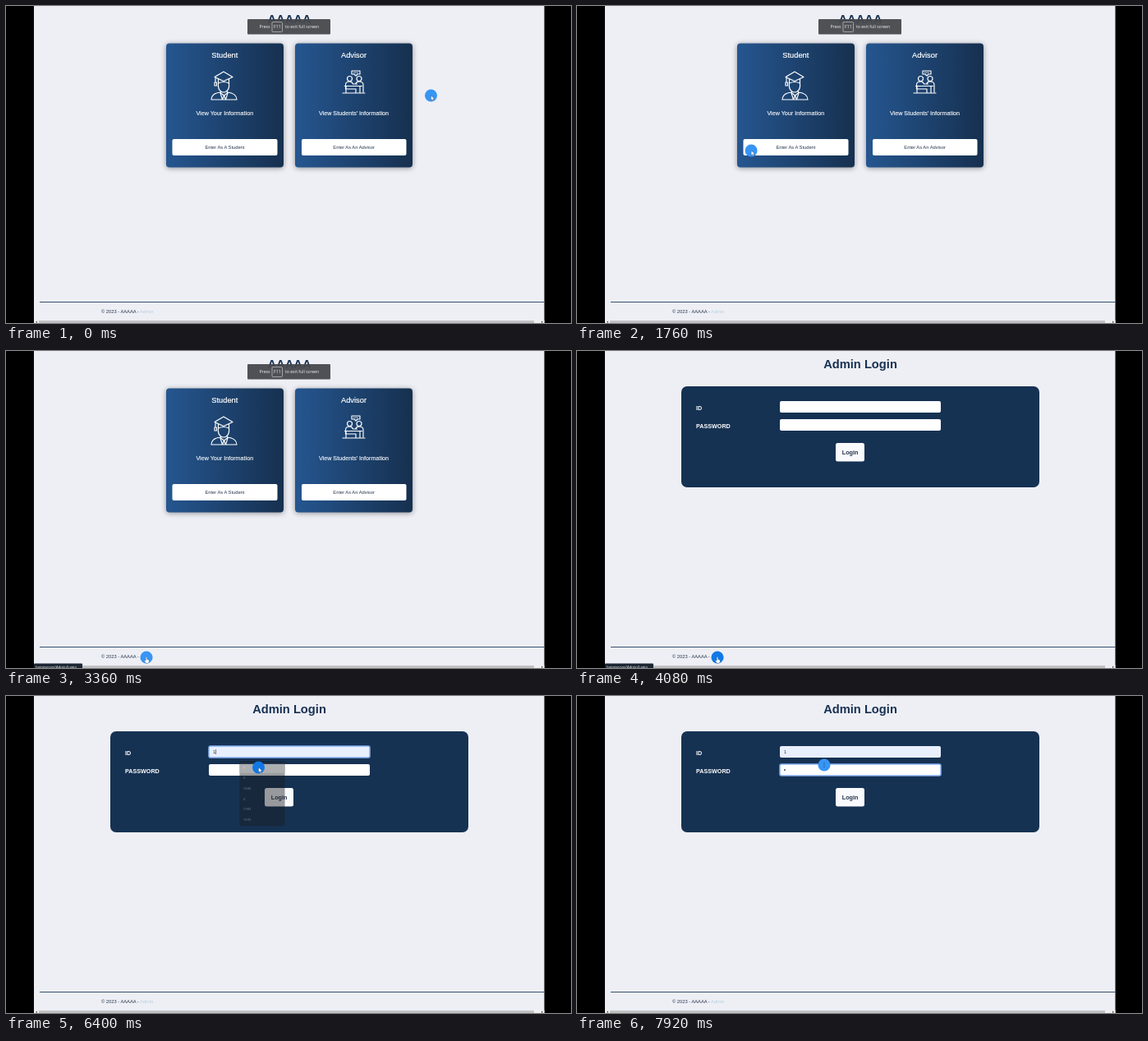
Animation, 688 px wide and 386 px high, one loop 8 s. Source, as an HTML page:

```html
<!DOCTYPE html>
<html lang="en">
<head>
<meta charset="utf-8">
<title>Admin login walkthrough</title>
<style>
  html, body { margin: 0; width: 100%; height: 100%; overflow: hidden; background: #000; }
  svg { display: block; width: 688px; height: 386px; }
  text { font-family: "Liberation Sans", Arial, sans-serif; font-size: 5.76px; fill: #26364d; }
  .mid { text-anchor: middle; }
  .title { font-size: 14.7px; font-weight: bold; fill: #183253; }
  .label { font-size: 7.2px; font-weight: bold; fill: #fff; }
  .card { filter: drop-shadow(0 1px 3px rgba(0, 0, 0, .4)); }
  .heading { font-size: 9.3px; fill: #fff; stroke: #fff; stroke-width: .2px; }
  .sub { font-size: 7.2px; fill: #fff; stroke: #fff; stroke-width: .12px; }
  .icon { fill: none; stroke: #fff; stroke-width: 1.15; stroke-linejoin: round; stroke-linecap: round; }
  .ui, .ui text { font-family: "Open Sans", "Noto Sans", sans-serif; font-size: 5.2px; fill: #f4f4f4; }
  #menu text { font-size: 4.4px; fill: #d0d2d5; }
  #menu { transform-box: fill-box; transform-origin: center; }
  .focus { stroke: #86b1f2; stroke-width: 1.5; }
</style>
</head>
<body>
<svg viewBox="0 0 688 386">
  <defs>
    <linearGradient id="blue">
      <stop offset="0" stop-color="#255690"/>
      <stop offset="1" stop-color="#16304f"/>
    </linearGradient>
  </defs>
  <rect x="34" width="621.5" height="386" fill="#eeeff5"/>

  <g id="home">
    <text class="title mid" x="345" y="21">AAAAA</text>
    <rect class="card" x="195" y="45.5" width="143" height="151" rx="4" fill="url(#blue)"/>
    <rect class="card" x="352" y="45.5" width="143" height="151" rx="4" fill="url(#blue)"/>
    <text class="heading mid" x="266.3" y="63.3">Student</text>
    <text class="heading mid" x="423.5" y="63.3">Advisor</text>
    <text class="sub mid" x="266.3" y="133.3">View Your Information</text>
    <text class="sub mid" x="423.5" y="133.3">View Students' Information</text>
    <rect x="202.5" y="162" width="128" height="20" rx="2" fill="#fff"/>
    <rect x="360" y="162" width="127.5" height="20" rx="2" fill="#fff"/>
    <text class="mid" x="266.4" y="174">Enter As A Student</text>
    <text class="mid" x="423.6" y="174">Enter As An Advisor</text>
    <g class="icon">
      <path d="M254 86.500l11-6.500 11 6.500-11 5zM255 87v6m-1 0h2.500v4h-2.500zM258.500 89v5q6.500-3 13 0v-5"/>
      <path d="M258.500 94q-1 8 4 10.500 2.500 1 5 0 5-2.500 4-10.500M261.500 104v2l4 3 4-3v-2"/>
      <path d="M261.500 105q-11 1-11.500 9h31q-.5-8-11.500-9M261 106l2.500 8 2-5 2 5 2.500-8"/>
    </g>
    <g class="icon" stroke-width="1">
      <path d="M421 79h10v4h-3l-2 2-2-2h-3zM423.500 81h.5m1.500 0h.5m1.500 0h.5"/>
      <circle cx="418.500" cy="88.500" r="3"/><circle cx="430" cy="88.500" r="3"/>
      <path d="M413.500 101v-5q0-4 5-4 3 0 4 3h5M425.500 95q1-3 4.500-3 5 0 5 4v9"/>
      <path d="M412.500 97.500h21M414 101h12v4.500M414 97.500v8M431 97.500v8M410 106h27"/>
    </g>
  </g>

  <g id="login">
    <text class="title mid" x="345" y="21">Admin Login</text>
    <rect x="127" y="43" width="436" height="123" rx="7" fill="#163253"/>
    <text class="label" x="145" y="72.100">ID</text>
    <text class="label" x="145" y="93.700">PASSWORD</text>
    <rect id="idField" x="247" y="61" width="196" height="14" rx="2" fill="#fff"/>
    <rect id="passField" x="247" y="83" width="196" height="14" rx="2" fill="#fff"/>
    <text id="idText" x="252" y="70">1</text>
    <path id="caret" d="M255.500 65v6" stroke="#222" stroke-width=".6"/>
    <circle id="passText" cx="253" cy="90" r=".9" fill="#26364d"/>
    <rect x="315" y="112" width="35" height="22.500" rx="2.500" fill="#f9fafd"/>
    <text class="label mid" x="332.600" y="126" style="fill:#22304a">Login</text>
    <g id="menu" class="ui">
      <rect x="283.500" y="77.500" width="57" height="82.500" rx="1.500" fill="#1a1c20"/>
      <rect id="hoverRow" x="283.500" y="80.500" width="57" height="12.500" fill="#45484d"/>
    </g>
  </g>

  <path d="M41 360.500H655.500" stroke="#36516f"/>
  <text x="116" y="373.800">© 2023 - AAAAA - <tspan id="link" fill="#b4cfe0">Admin</tspan></text>
  <rect x="34" y="382.500" width="621.500" height="4" fill="#f0f0f2"/>
  <rect x="40" y="383" width="603" height="3" fill="#c1c1c3"/>
  <path d="M38 383.500v2.500l-2-1.250zM652 383.500v2.500l2-1.250z" fill="#555"/>

  <g id="banner" class="ui">
    <rect x="294" y="16" width="101" height="18.500" rx="1" fill="#47494d" fill-opacity=".95"/>
    <rect x="324" y="19.500" width="12.500" height="12" rx="1" fill="none" stroke="#c8c8ca" stroke-width=".7"/>
    <text x="308.500" y="27.200">Press</text>
    <text class="mid" x="330.300" y="27.200">F11</text>
    <text x="340" y="27.200">to exit full screen</text>
  </g>
  <g id="status" class="ui">
    <rect x="34" y="380.500" width="59" height="6" rx="1" fill="#1c2733"/>
    <text x="36" y="386" style="font-size:4.200px">homeserver/Admin/Login</text>
  </g>

  <g id="cursor">
    <circle id="dot" r="7.500"/>
    <path id="arrow" d="M0 0v6l1.500-1.300 1 2.200 1-.5-1-2.100h2z" fill="#fff" stroke="#24405f" stroke-width=".4"/>
    <path id="hand" d="M-.8 0q.8-.8 1.500 0v2.500l2.500.7v2.300l-1 1.500h-3l-2-3 .8-.5 1.200 1z" fill="#fff" stroke="#24405f" stroke-width=".3"/>
    <path id="beam" d="M-1-2.500h2M0-2.500v5M-1 2.500h2" stroke="#235a9c" stroke-width=".5"/>
  </g>
</svg>
<script>
const LOOP = 8000;
const $ = id => document.getElementById(id);
const show = (id, on) => { $(id).style.display = on ? "" : "none"; };
const clamp = v => Math.min(1, Math.max(0, v));
const within = (t, from, to) => t >= from && t < to;

// time, x, y
const path = [
  [0, 517.5, 109], [80, 490, 98], [240, 284, 70], [400, 284, 70],
  [880, 210, 80], [1280, 210, 80], [2480, 216, 352], [2640, 215, 354],
  [3040, 171, 373], [4640, 171, 373], [5200, 303, 71], [5680, 303, 71],
  [6080, 307.5, 87], [6560, 307.5, 87], [6880, 302, 89], [7200, 302, 89],
  [7680, 301, 84], [8000, 301, 84]
];
const clicks = [[960, 1120], [3840, 4240], [5200, 5300], [6240, 6440], [6880, 7000]];

["1", "3", "1840", "4", "1983", "1839"].forEach((value, i) => {
  const row = document.createElementNS("http://www.w3.org/2000/svg", "text");
  row.setAttribute("x", 288);
  row.setAttribute("y", 87.7 + i * 13.1);
  row.textContent = value;
  $("menu").append(row);
});

function cursorAt(t) {
  const i = path.findIndex(p => p[0] > t);
  const [t0, x0, y0] = path[i - 1], [t1, x1, y1] = path[i];
  const u = (t - t0) / (t1 - t0), e = u * u * (3 - 2 * u);
  return [x0 + (x1 - x0) * e, y0 + (y1 - y0) * e];
}

function draw(t) {
  const loginOpen = t >= 3920;
  show("home", !loginOpen);
  show("login", loginOpen);
  $("banner").style.opacity = 1 - clamp((t - 3360) / 240);

  const overLink = within(t, 3040, 4720);
  show("status", within(t, 3120, 4960));
  $("link").setAttribute("text-decoration", overLink ? "underline" : "none");

  const fade = clamp((t - 6310) / 160);
  show("menu", t >= 5280 && fade < 1);
  show("hoverRow", t >= 5920);
  $("menu").style.opacity = 1 - fade;
  $("menu").style.transform = `scale(${1 - fade * .06})`;

  const filled = t >= 6240;
  $("idField").setAttribute("fill", t >= 5920 ? "#e8f0fe" : "#fff");
  $("idField").classList.toggle("focus", within(t, 5400, 6960));
  $("passField").classList.toggle("focus", t >= 6960);
  show("idText", filled);
  show("caret", within(t, 6240, 6800));
  show("passText", t >= 7520);

  const [x, y] = cursorAt(t);
  const pressed = clicks.some(([from, to]) => within(t, from, to));
  const overField = loginOpen && y < 98 && !within(t, 5800, 6700);
  $("cursor").setAttribute("transform", `translate(${x} ${y})`);
  $("dot").setAttribute("fill", pressed ? "#1078e6" : "#3795f5");
  show("hand", overLink);
  show("beam", overField);
  show("arrow", !overLink && !overField);
}

function tick() {
  draw(performance.now() % LOOP);
  requestAnimationFrame(tick);
}
tick();
</script>
</body>
</html>
```
